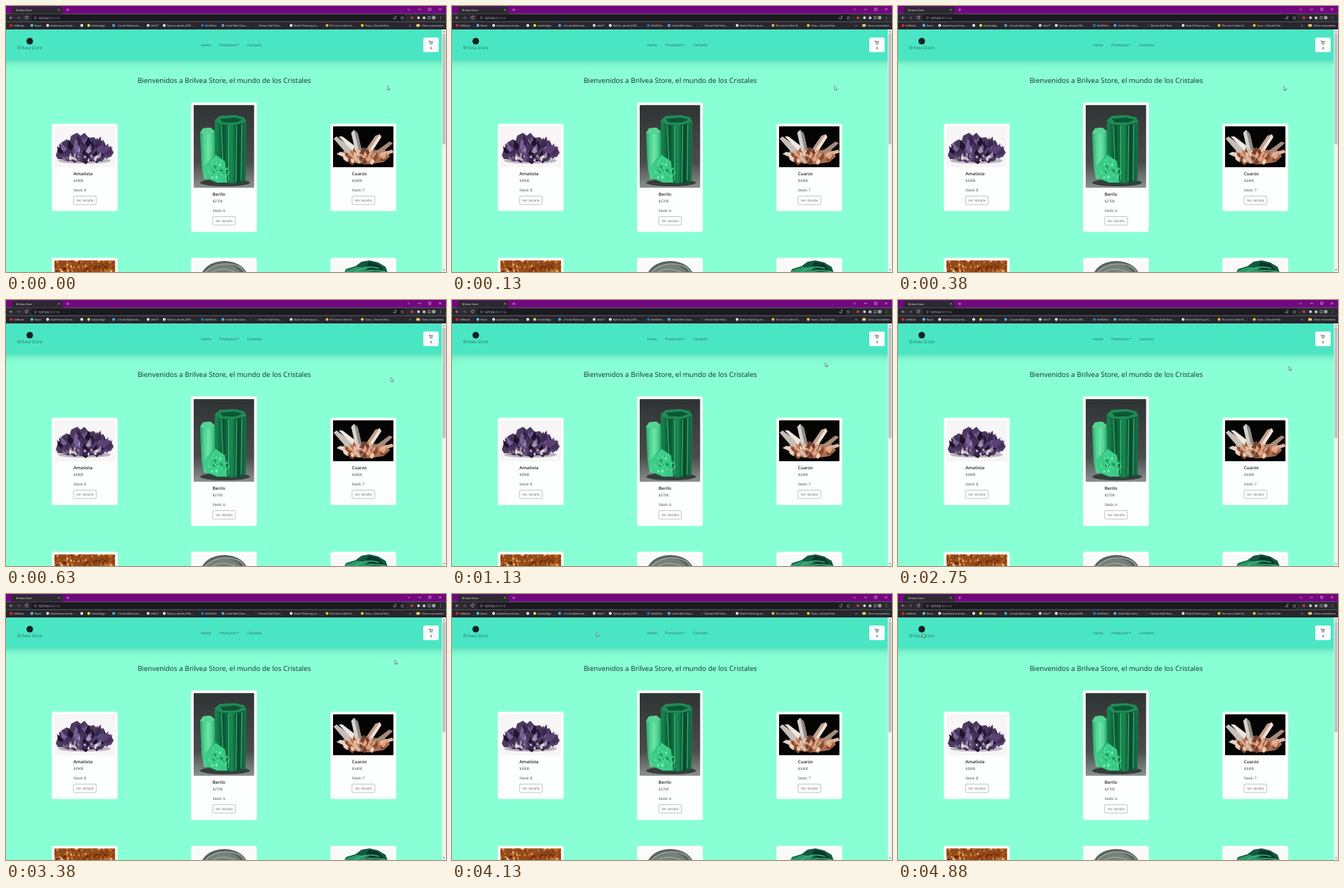
An HTML page for the animation above (5.12 s loop, 600 by 363 pixels).

```html
<!DOCTYPE html>
<html lang="es">
<head>
<meta charset="utf-8">
<title>Brilvea Store</title>
<style>
  html, body { margin: 0; width: 100%; height: 100%; overflow: hidden; background: #89ffd5; }
  #stage { display: block; width: 600px; height: 363px; }
  text { font-family: "Open Sans", "Noto Sans", sans-serif; text-rendering: geometricPrecision; white-space: pre; }
</style>
</head>
<body>
<svg id="stage" viewBox="0 0 600 363" xmlns="http://www.w3.org/2000/svg"></svg>
<script>
const STORE = 'Brilvea Store';
const PAGE = '#89ffd5';

const rect = (x, y, w, h, fill, extra = '') =>
  `<rect x="${x}" y="${y}" width="${w}" height="${h}" fill="${fill}" ${extra}/>`;
const dot = (x, y, r, fill) => `<circle cx="${x}" cy="${y}" r="${r}" fill="${fill}"/>`;
const oval = (x, y, rx, ry, fill, extra = '') =>
  `<ellipse cx="${x}" cy="${y}" rx="${rx}" ry="${ry}" fill="${fill}" ${extra}/>`;
const poly = (points, fill, extra = '') => `<polygon points="${points}" fill="${fill}" ${extra}/>`;
const line = (d, stroke, width = 0.6) =>
  `<path d="${d}" fill="none" stroke="${stroke}" stroke-width="${width}"/>`;
const text = (x, y, size, fill, label, extra = '') =>
  `<text x="${x}" y="${y}" font-size="${size}" fill="${fill}" ${extra}>${label}</text>`;
const gradient = (id, stops, across = false) =>
  `<linearGradient id="${id}" x2="${across ? 1 : 0}" y2="${across ? 0 : 1}">` +
  stops.map(([at, color, alpha = 1]) =>
    `<stop offset="${at}" stop-color="${color}" stop-opacity="${alpha}"/>`).join('') +
  '</linearGradient>';

function seeded(seed) {
  return () => (seed = (seed * 16807) % 2147483647) / 2147483647;
}

// Scatters small pointed facets inside an ellipse.
function facets({ seed, count, cx, cy, rx, ry, size, colors }) {
  const random = seeded(seed);
  let out = '';
  for (let i = 0; i < count; i++) {
    const angle = random() * Math.PI * 2;
    const radius = Math.sqrt(random());
    const x = cx + Math.cos(angle) * radius * rx;
    const y = cy + Math.sin(angle) * radius * ry;
    const s = size * (0.5 + random() * 0.7);
    const lean = (x - cx) / rx * s * 0.7;
    const corners = [[x - s * 0.5, y + s * 0.4], [x + lean, y - s * 0.7], [x + s * 0.5, y + s * 0.3], [x, y + s * 0.8]];
    const points = corners.map(p => p.map(n => n.toFixed(1))).join(' ');
    out += poly(points, colors[Math.floor(random() * colors.length)]);
  }
  return out;
}

const photos = {
  amethyst: () => rect(0, 0, 83, 56, '#f7f5f6') +
    oval(41, 47, 36, 4, '#b9b4bd') +
    poly('2,40 5,31 11,29 10,22 17,18 21,20 23,13 31,9 36,13 41,9 47,16 54,15 60,21 67,19 69,25 77,29 81,36 77,42 69,43 65,48 52,47 42,50 27,47 18,48 11,45 5,45', '#4d3a61') +
    facets({ seed: 41, count: 95, cx: 41, cy: 32, rx: 34, ry: 14, size: 8,
      colors: ['#291a39', '#3b2651', '#5b4276', '#785f95', '#a291b4', '#463055', '#1e142b'] }) +
    facets({ seed: 9, count: 20, cx: 42, cy: 43, rx: 30, ry: 3, size: 4,
      colors: ['#c0b4c4', '#877792', '#55445f', '#ded5dc'] }),

  beryl: () => rect(0, 0, 83, 113, 'url(#slate)') +
    oval(43, 106, 34, 5, '#343e3b') +
    poly('9,38 13,32 23,31 29,36 31,101 14,101 11,84', 'url(#paleGreen)') +
    poly('9,38 13,32 23,31 29,36 23,40 14,40', '#56d493') +
    poly('29,21 36,15 57,14 69,17 72,23 71,104 58,107 32,106 18,100 15,84 29,68', 'url(#beryl)') +
    poly('15,84 30,68 43,77 46,106 32,106 18,100', '#43dd95', 'opacity=".85"') +
    poly('29,21 36,15 57,14 69,17 72,23 59,27 37,27', '#218b56') +
    poly('36,19 56,17 67,20 58,24 40,24', '#0b5734') +
    line('M14 41L16 83M23 41L25 73M38 28L40 75M48 28L48 103M59 28L58 105M66 26L65 103', '#64e4a1', 0.7) +
    facets({ seed: 23, count: 38, cx: 34, cy: 88, rx: 15, ry: 15, size: 3,
      colors: ['#8cf4bf', '#39c47e', '#168d54', '#55df9d'] }),

  quartz: () => rect(0, 0, 83, 56, '#050404') +
    poly('14,34 31,29 52,32 72,33 78,41 69,49 48,52 28,50 17,43', '#a86f52') +
    poly('1,17 5,14 26,30 29,40 21,40', '#c7bfb7') +
    poly('8,14 13,14 30,27 27,34', '#eee6df') +
    poly('25,9 29,5 34,10 40,36 31,36', '#d7d2cc') +
    poly('29,5 34,10 40,36 35,32', '#8f8984') +
    poly('58,13 64,11 66,15 51,38 43,35', '#c3a291') +
    poly('64,11 66,15 51,38 49,34', '#efe1d6') +
    poly('77,21 82,23 65,38 52,39', '#a68a7a') +
    poly('81,32 83,36 61,43 55,39', '#ddb69e') +
    poly('5,38 10,35 31,39 32,46 21,45', '#ded4cb') +
    facets({ seed: 61, count: 48, cx: 44, cy: 41, rx: 26, ry: 9, size: 7,
      colors: ['#8f4b2d', '#c87b53', '#e1a27e', '#f0cfba', '#d6b8a6', '#75412e'] }),

  citrine: () => rect(0, 0, 83, 20, '#914919') +
    facets({ seed: 73, count: 230, cx: 41, cy: 8, rx: 48, ry: 16, size: 3.2,
      colors: ['#572006', '#a45117', '#cf7928', '#e2a45d', '#773009', '#efc28d', '#b45b18'] }),

  greyStone: () => rect(0, 0, 83, 20, '#f9faf9') +
    oval(42, 24, 32, 23, '#59645e') +
    oval(40, 22, 25, 17, '#748078') +
    line('M15 17Q28 3 48 5T70 19M23 18Q38 6 61 18', '#a1aaa2', 1.2),

  malachite: () => rect(0, 0, 83, 20, '#f8faf9') +
    poly('14,20 18,12 31,8 39,2 50,0 62,3 72,9 76,20', '#125a3f') +
    poly('18,14 32,9 48,11 37,20 15,20', '#2c9868') +
    poly('49,2 62,5 69,13 58,15 45,8', '#08382a') +
    line('M29 17Q43 5 63 11M34 20Q50 10 73 16', '#49bd86', 1.2)
};

function photo(name, x, y, w, h) {
  return `<svg x="${x}" y="${y}" width="${w}" height="${h}" viewBox="0 0 ${w} ${h}">${photos[name]()}</svg>` +
    rect(x - 0.4, y - 0.4, w + 0.8, h + 0.8, 'none', 'rx="1.7" stroke="#fdfefe" stroke-width=".8"');
}

function card(x, y, height, picture, pictureHeight, name, price, stock) {
  const left = x + 29.4;
  const top = y + pictureHeight;
  const ink = '#32363a';
  return rect(x, y, 89.6, height, '#fdfefe', 'rx="2.2" stroke="#d8eee7" stroke-width=".3"') +
    photo(picture, x + 3.3, y + 3.3, 83, pictureHeight) +
    (name ? text(left, top + 14.2, 6, '#202428', name, 'font-weight="600"') +
      text(left, top + 23.6, 4.75, ink, price) +
      text(left, top + 35.9, 4.75, ink, `Stock: ${stock}`) +
      rect(left + 0.1, top + 42.6, 31, 11.6, 'none', 'rx="1.6" stroke="#777e84" stroke-width=".45"') +
      text(left + 15.6, top + 50.1, 4.75, '#70777d', 'Ver detalle', 'text-anchor="middle"') : '');
}

const bookmarks = [
  [5, '#f02222', 'VidNube'], [33.5, '#54cbe5', 'React'],
  [55, '#eeeeee', 'Academia enLinea...'], [101.5, '#f3f3f3', ''],
  [111, '#e5eb46', 'AulaCodigo'], [145, '#47aef0', '- Circulo Matricula...'],
  [192, '#dddddd', 'Velta™'], [214, '#eeeeee', 'Python_desde_0/RE...'],
  [266, '#147ac1', 'RedOficio'], [294, '#59a9e1', 'Initial Web Class...'],
  [339, '#333333', 'Distant Staff Hub...'], [387, '#e4e8e8', 'Sketch Planning en...'],
  [436, '#e7bd36', 'The Icon Crafter B...'], [484, '#f4c72b', 'Trazu | Shared Pad...']
];

function browser() {
  const pale = '#d9d7dc';
  return rect(0, 0, 600, 10.5, '#74077f') +
    '<path d="M6 10.5Q8 10.5 8 8V3Q8 1 10 1H75Q77 1 77 3V8Q77 10.5 79 10.5Z" fill="#2c2930"/>' +
    text(14, 6.5, 3.65, '#f2eff4', STORE) +
    line('M71 4l2.4 2.4m0-2.4L71 6.4', pale, 0.5) +
    line('M82.2 5.2h4m-2-2v4', '#eed8f0', 0.5) +
    line('M547.5 4l1.6 1.5 1.6-1.5M562 4.7h4M576.3 3h3v3h-3zM590.5 3l3 3m0-3l-3 3', '#f2e7f4', 0.55) +
    rect(0, 10.5, 600, 11, '#2c2930') +
    rect(0, 21.5, 600, 10.5, '#29262d') +
    line('M9 16H5m1.8-1.8L5 16l1.8 1.8', pale) +
    line('M15 16h4m-1.8-1.8L19 16l-1.8 1.8', '#85818a') +
    line('M29.6 14.5a2 2 0 1 0 .3 2M29.8 13.7v1.5h-1.5', pale) +
    rect(34, 11.8, 511, 8.5, '#1c1a20', 'rx="4.2"') +
    line('M38.5 16.1a1.6 1.6 0 1 0 3.2 0a1.6 1.6 0 1 0-3.2 0M40.1 15.9v1', '#aaa6ad', 0.45) +
    text(44, 17.6, 4.3, '#f4f3f5', '127.0.0.1<tspan fill="#99959c">:5116</tspan>') +
    line('M528.5 15.5v2h3v-2M530 16.5l2-2.7m-1.5 0h1.5v1.4', pale, 0.45) +
    line('M540.5 13.8l.7 1.5 1.7.2-1.2 1.1.3 1.7-1.5-.8-1.5.8.3-1.7-1.2-1.1 1.7-.2z', pale, 0.4) +
    dot(553.5, 16, 1.8, '#d94343') + dot(562.5, 16, 1.8, '#eeeeee') +
    rect(568.5, 14.5, 3.2, 3.2, '#dad8dd', 'rx=".5"') +
    line('M575.5 14.5h3.6v3h-3.6z', pale, 0.5) +
    dot(583.3, 16, 2.4, '#a1a79f') +
    [14.2, 16, 17.8].map(y => dot(592.5, y, 0.45, pale)).join('') +
    bookmarks.map(([x, color, label]) =>
      dot(x + 1.8, 26.5, 1.9, color) + text(x + 5.4, 27.8, 3.55, '#e9e7eb', label)).join('') +
    text(550, 27.9, 4.6, '#f1eff2', '»') +
    rect(559.5, 24.7, 4.8, 3.6, '#f3cf6a', 'rx=".4"') +
    text(567, 27.8, 3.55, '#e9e7eb', 'Otros marcadores');
}

function navbar() {
  const ink = '#2e625b';
  return rect(0, 74, 594.5, 16, 'url(#shadow)') +
    rect(0, 32, 594.5, 42, '#4ae6c3') +
    dot(32.4, 48, 4.5, '#17211f') +
    text(32.4, 59.1, 6.05, '#173c36', STORE, 'text-anchor="middle" font-weight="300"') +
    text(266, 54.7, 4.85, ink, 'Home') +
    text(291, 54.7, 4.85, ink, 'Productos') +
    poly('314.7,52.3 317.3,52.3 316,53.7', ink) +
    text(328.4, 54.7, 4.85, ink, 'Contacto') +
    rect(569, 43, 21, 20, '#f9fcfb', 'rx="2"') +
    line('M576.5 47.6h1l.9 3.3h2.6l.7-2.4h-3.8', '#23282b', 0.6) +
    dot(578.7, 52, 0.5, '#23282b') + dot(580.8, 52, 0.5, '#23282b') +
    text(579.4, 58.6, 4.4, '#23282b', '3', 'text-anchor="middle" font-weight="600"');
}

document.getElementById('stage').innerHTML =
  '<defs>' +
    gradient('shadow', [[0, '#3cc4a2', 0.5], [0.4, '#58dfb9', 0.25], [1, PAGE, 0]]) +
    gradient('slate', [[0, '#303334'], [0.7, '#484d4c'], [1, '#8b918e']]) +
    gradient('beryl', [[0, '#188451'], [0.3, '#17804c'], [0.45, '#075330'], [0.65, '#198c51'], [0.8, '#06472b'], [1, '#187646']], true) +
    gradient('paleGreen', [[0, '#2bac6c'], [0.5, '#6ce8a9'], [1, '#24a769']], true) +
  '</defs>' +
  rect(0, 0, 600, 363, PAGE) + browser() + navbar() +
  text(297.6, 105.4, 9.5, '#17302b', `Bienvenidos a ${STORE}, el mundo de los Cristales`, 'text-anchor="middle" font-weight="500"') +
  card(62.6, 160.8, 119, 'amethyst', 56, 'Amatista', '$3900', 8) +
  card(252.4, 131.8, 176.4, 'beryl', 113, 'Berilo', '$2700', 6) +
  card(442.4, 160.8, 119, 'quartz', 56, 'Cuarzo', '$3400', 7) +
  card(62.6, 343.8, 40, 'citrine', 20) +
  card(252.4, 343.8, 40, 'greyStone', 20) +
  card(442.4, 343.8, 40, 'malachite', 20) +
  rect(594.5, 32, 5.5, 331, '#f0f1f1') +
  rect(595.3, 37.5, 4, 151, '#bfc1c2') +
  poly('596,35.7 598.6,35.7 597.3,34', '#555') +
  poly('596,359.5 598.6,359.5 597.3,361', '#555') +
  '<path id="cursor" d="M0 0V5.3L1.2 4.2L2 6.1L2.9 5.7L2.1 3.9H3.7Z" fill="#fff" stroke="#18352f" stroke-width=".5"/>';

const LOOP = 5120;
const TICK = 125;
const LAST_TICK = 39;
const route = [
  [0, 520, 109], [3, 526, 109.5], [5, 525, 106], [9, 509, 85.5], [15, 514, 89.5],
  [16, 515, 90], [17, 515, 90], [22, 533, 90.5], [27, 530, 90], [28, 530, 90],
  [33, 197, 52.5], [38, 43, 54], [39, 33.7, 54]
];
const cursor = document.getElementById('cursor');

function render(time) {
  const tick = Math.min(LAST_TICK, Math.floor((time % LOOP) / TICK));
  const next = Math.max(1, route.findIndex(([at]) => at >= tick));
  const [startTick, x0, y0] = route[next - 1];
  const [endTick, x1, y1] = route[next];
  const u = (tick - startTick) / (endTick - startTick);
  const ease = u * u * (3 - 2 * u);
  cursor.setAttribute('transform', `translate(${x0 + (x1 - x0) * ease} ${y0 + (y1 - y0) * ease})`);
}

const start = performance.now();
function loop() {
  render(performance.now() - start);
  requestAnimationFrame(loop);
}
loop();
</script>
</body>
</html>
```
